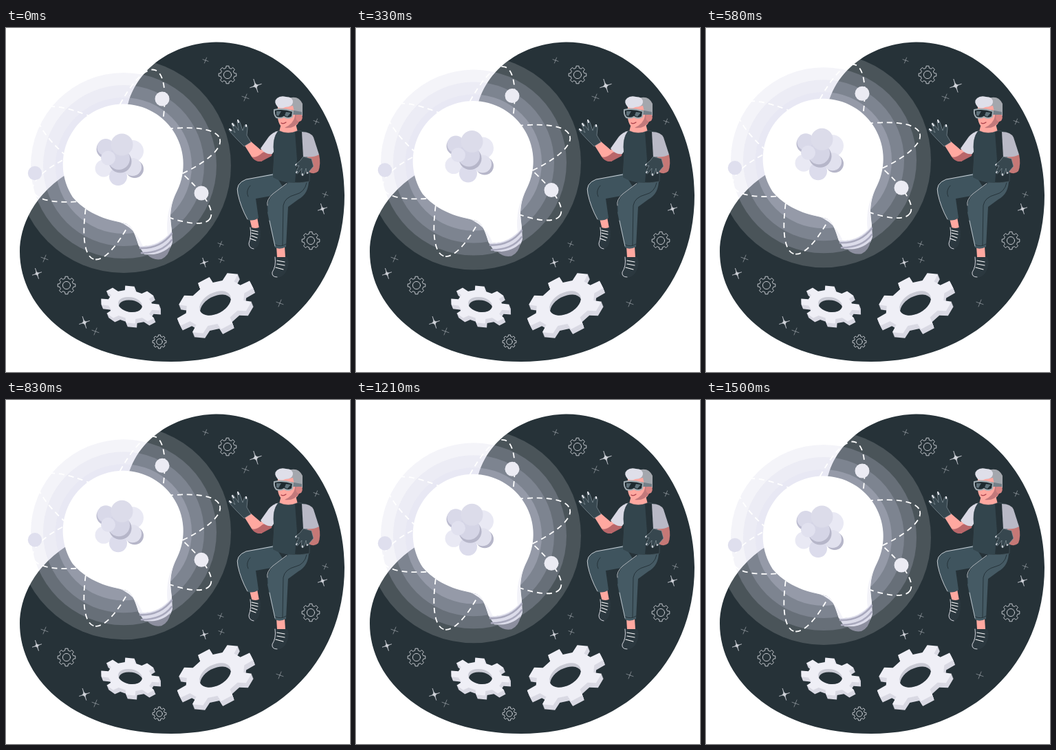
An HTML page for the animation above (1540 ms loop, 500 px wide and 500 px high).

```html
<!DOCTYPE html>
<html lang="en">
<head>
<meta charset="utf-8">
<title>Floating idea</title>
<style>
  html, body { margin: 0; width: 100%; height: 100%; overflow: hidden; background: #fff; }
  svg { display: block; width: 100vw; height: 100vh; }
  .line { fill: none; stroke-linecap: round; stroke-linejoin: round; }
</style>
</head>
<body>
<svg viewBox="0 0 500 500">
  <path fill="#263238" d="M305 20.5C410 20 492 125 492 243C492 385 385 485 240 485C105 485 20 410 20 325C20 290 38 240 100 205C160 180 168 140 178 108C192 60 240 22 305 20.5Z"/>
  <g id="sky" class="line" stroke="#d3d6dc" stroke-width=".9"></g>

  <g id="bulb">
    <g id="halo"></g>
    <g id="orbits" class="line" stroke="#fff" stroke-width="1.8" stroke-dasharray="8 6" style="stroke-linecap:butt"></g>
    <path fill="#dcdcea" d="M193 317Q222 318 241 294L242 311Q238 328 222 330L201 329Z"/>
    <path fill="#8d8f9f" d="M206 330Q228 329 239 317Q237 331 226 336Q214 338 206 330Z"/>
    <g class="line" stroke="#a9a9bd" stroke-width="2.6">
      <path d="M195 320Q224 321 241 299M197 327Q227 327 241 308"/>
    </g>
    <path fill="#fff" d="M249 236C243 248 240 258 239 272C239 282 240 288 241 295Q222 319 193 317C188 303 185 290 176 285C160 280 125 278 97 246A87.5 87.5 0 1 1 249 236Z"/>
    <path fill="#f3f3f9" d="M251 232C241 250 239 260 239 276L241 295L235 302Q230 266 251 232ZM146 277Q184 282 199 317L193 317Q186 290 176 285Z"/>
    <g id="atom"></g>
  </g>

  <g id="gears"></g>

  <g id="person">
    <!-- far leg -->
    <path fill="#ffa8a0" d="M354 277L365 275L368 291L358 293Z"/>
    <path fill="#2b383f" d="M355 289Q363 293 369 289Q371 300 369 309Q367 321 358 322Q352 321 353 313Q357 301 355 289Z"/>
    <path fill="#3f545e" d="M390 211L349 220Q333 226 337 241Q341 260 352 279Q360 281 367 276L363 248L408 240Z"/>
    <path class="line" stroke="#d8dde2" stroke-width=".9" d="M388 213L349 220Q333 226 337 241Q341 260 351 278"/>
    <!-- near leg -->
    <path fill="#ffa8a0" d="M393 317L405 317L406 333L394 333Z"/>
    <path fill="#2b383f" d="M391 332Q401 337 408 332Q413 339 409 350Q404 363 392 363Q385 362 387 354Q393 345 391 332Z"/>
    <path fill="#455a64" d="M391 213L440 221Q440 241 425 249L410 260L407 318Q398 323 391 319Q385 294 380 268Q378 251 388 241L410 224Z"/>
    <path class="line" stroke="#26343b" stroke-width="1" d="M410 225L388 241Q378 251 380 267M437 225Q434 239 421 242Q405 246 403 258L402 316M355 229Q348 237 352 245M391 315Q400 319 407 314"/>
    <path class="line" stroke="#d8dde2" stroke-width=".8" d="M380 258Q378 250 388 241L408 226M391 317L383 280"/>
    <path class="line" stroke="#fff" stroke-width="1.2" d="M357 294L366 296M357 298L366 300M357 302L365 305M355 306L363 309M394 338L405 340M394 343L405 345M392 348L403 351"/>
    <path class="line" stroke="#e8e8f0" stroke-width=".9" d="M355 290Q357 302 353 313Q353 320 360 321M391 333Q393 346 387 355Q386 362 394 362"/>

    <!-- far arm -->
    <path fill="#ffa8a0" d="M347 171L356 165L370 177L383 169L389 180L371 194Q362 194 357 187Z"/>
    <path fill="#b9676a" d="M357 187Q363 190 373 181L388 176L386 186L371 194Q362 195 357 187Z"/>
    <path fill="#d9d9e4" d="M398 149Q388 151 382 158L370 175Q378 185 387 183L398 165Z"/>
    <path fill="#37474f" stroke="#91a0a8" stroke-width=".6" d="M346 172L335 161L325 150Q322 146 327 147L333 152L328 140Q329 136 332 140L338 149L336 136Q338 132 340 137L344 149L347 141Q351 139 351 145L350 156L356 166Z"/>
    <path class="line" stroke="#f2f2f7" stroke-width="2" d="M325 147L327 149M329 139L331 142M337 134L338 137M349 141L349 143"/>

    <!-- torso -->
    <path fill="#ffa8a0" d="M400 139L421 139L424 151Q411 160 397 151Z"/>
    <path fill="#263238" stroke="#4a5b64" stroke-width=".6" d="M396 149Q410 156 425 149L438 152Q443 165 442 184L441 223Q413 229 388 217L390 184Q386 161 396 149Z"/>
    <path fill="#33454d" d="M396 150Q409 156 420 151L423 191L420 225Q401 225 388 217L390 184Q387 162 396 150Z"/>

    <!-- near arm -->
    <path fill="#c57876" d="M439 183L455 184Q458 198 454 208Q448 214 440 209L435 200Z"/>
    <path fill="#b9b9c6" d="M430 151Q443 151 447 159L455 184Q446 189 432 187Z"/>
    <path fill="#37474f" stroke="#91a0a8" stroke-width=".6" d="M444 190L432 187Q428 194 421 198Q419 202 426 200L421 210Q423 214 426 209L430 204L429 213Q432 217 434 211L436 204L437 212Q440 212 441 208L447 201Z"/>
    <path class="line" stroke="#f2f2f7" stroke-width="1.6" d="M421 199L422 198M422 210L423 209M431 214L431 212M438 211L438 210"/>

    <!-- head -->
    <path fill="#ffa8a0" d="M395 110L426 110L426 136Q421 147 407 146Q397 145 395 131Z"/>
    <path fill="#c3797b" d="M420 117L427 117L427 135Q419 147 405 145Q418 139 420 128Z"/>
    <path fill="#a4a7ad" d="M406 104Q424 95 431 110L431 128L420 126L417 113L407 115Z"/>
    <path fill="#dfdfe9" d="M395 115Q388 107 394 102Q399 98 407 100Q417 100 417 108Q416 115 406 115Q400 118 395 115Z"/>
    <ellipse cx="426" cy="130" rx="4.8" ry="6" fill="#d98684"/>
    <path fill="#758088" d="M414 119L430 122L430 126L414 126Z"/>
    <path fill="#1d292f" stroke="#a3adb3" stroke-width="2" d="M390 119Q403 116 417 121L416 129Q410 133 404 129Q400 132 393 130Q389 126 390 119Z"/>
    <path fill="#60727b" d="M393 121L400 121L396 128L393 127ZM407 122L414 123L409 129L405 127Z"/>
    <path class="line" stroke="#a83f48" stroke-width="1.2" d="M400 138Q403 140 407 137"/>
  </g>
</svg>
<script>
const fill = (id, html) => document.getElementById(id).innerHTML = html;

// Closed cog outline: four points per tooth on an ellipse tilted by `tilt` degrees.
function cog(cx, cy, a, b, tilt = 0, phase = 0, root = .76) {
  const turn = tilt * Math.PI / 180, points = [];
  for (let tooth = 0; tooth < 8; tooth++) {
    for (const [angle, scale] of [[-13, root], [-9, 1], [9, 1], [13, root]]) {
      const p = (phase + tooth * 45 + angle) * Math.PI / 180;
      const x = a * scale * Math.cos(p), y = b * scale * Math.sin(p);
      points.push([cx + x * Math.cos(turn) - y * Math.sin(turn),
                   cy + x * Math.sin(turn) + y * Math.cos(turn)].map(v => v.toFixed(1)));
    }
  }
  return `M${points.join('L')}Z`;
}

const circle = (x, y, r, color, attrs = '') =>
  `<circle cx="${x}" cy="${y}" r="${r}" fill="${color}" ${attrs}/>`;
const ellipse = (x, y, rx, ry, tilt, attrs = '') =>
  `<ellipse rx="${rx}" ry="${ry}" transform="translate(${x} ${y}) rotate(${tilt})" ${attrs}/>`;

const cogIcon = ([x, y, r]) =>
  `<path d="${cog(x, y, r, r, 0, 0, .78)}"/><circle cx="${x}" cy="${y}" r="${r * .43}"/>`;
const star = ([x, y, r]) =>
  `<path transform="translate(${x} ${y}) rotate(-18) scale(${r})" fill="#d3d6dc" stroke-width="${.5 / r}"
    d="M0-1C0-.1 .1 0 .9 0C.1 0 0 .1 0 1C0 .1-.1 0-.9 0C-.1 0 0-.1 0-1Z"/>`;
const cross = ([x, y, r]) =>
  `<path opacity=".55" d="M${x - r} ${y - r * .35}L${x + r} ${y + r * .35}M${x + r * .4} ${y - r}L${x - r * .4} ${y + r}"/>`;

fill('sky',
  [[322, 68, 13], [88, 374, 13], [443, 309, 13], [223, 456, 10]].map(cogIcon).join('') +
  [[363, 84, 10], [460, 263, 8], [114, 428, 9], [45, 357, 8], [288, 341, 7]].map(star).join('') +
  [[290, 47, 4], [348, 101, 5], [451, 136, 4], [464, 242, 4], [312, 314, 4],
   [313, 337, 4], [398, 400, 5], [130, 441, 5], [56, 335, 5]].map(cross).join(''));

fill('halo', [
  [156, '#fff', .165], [135, '#cbcbe3', .22], [117, '#cbcbe3', .22], [99, '#dcdced', .25]
].map(([r, color, alpha]) => circle(171, 200, r, color, `fill-opacity="${alpha}"`)).join(''));

fill('orbits',
  [[175, 199, 141, -15.5], [172, 199, 147, 32], [172, 198.5, 144.5, 108]]
    .map(([x, y, a, tilt]) => ellipse(x, y, a, 40, tilt)).join('') +
  [[227, 103, 10.5, '#ebebf3'], [284, 240, 10.5, '#ebebf3'], [42, 211, 10.2, '#dfdfee']]
    .map(orb => circle(...orb, 'stroke="none"')).join(''));

fill('atom', [
  [184, 179, 16, '#e9e9f4'], [145, 176, 13.5, '#bcbcd0'], [145, 173.5, 12.5, '#d9d9e9'],
  [142, 204, 12.5, '#e9e9f4'], [163, 216, 13, '#dcdcec'], [187, 205, 13, '#b6b6c9'],
  [184, 202, 13, '#e1e1ee'], [166, 194, 16.5, '#b6b6c9'], [164, 190, 16, '#d5d5e6'],
  [168.5, 169.5, 16, '#dcdcea'], [148.5, 189, 10.5, '#e1e1ef']
].map(ball => circle(...ball)).join(''));

function solidGear(x, y, a, b, tilt, phase, depth) {
  const hole = [a * .41, b * .4, tilt];
  let sides = '';
  for (let d = depth; d > 0; d--)
    sides += `<path fill="#d9d9e3" d="${cog(x + d * .4, y + d, a, b, tilt, phase)}"/>`;
  return sides +
    `<path fill="#efeff6" d="${cog(x, y, a, b, tilt, phase)}"/>` +
    ellipse(x, y, ...hole, 'fill="#c9cad4"') +
    `<clipPath id="hole${x}">${ellipse(x, y, ...hole)}</clipPath>
     <g clip-path="url(#hole${x})">${ellipse(x + 1, y + depth * .75, ...hole, 'fill="#263238"')}</g>`;
}
fill('gears', solidGear(180.5, 402, 43, 27, 10, 38, 6) + solidGear(304, 400, 60, 38, -28, 46, 7));

// Linear bob, shown at 24 pictures per second.
const LOOP = 1540, STEP = 1000 / 24, PERIOD = 1500, LEAD = 45, RISE = 10;
const bulb = document.getElementById('bulb');
const start = performance.now();

function draw(now) {
  const elapsed = Math.max(0, now - start) % LOOP;
  const time = Math.floor((elapsed + 4) / STEP) * STEP;
  const phase = (time + LEAD) / PERIOD % 1;
  const lift = RISE * (1 - Math.abs(2 * phase - 1));
  bulb.setAttribute('transform', `translate(0 ${(.6 - lift).toFixed(2)})`);
  requestAnimationFrame(draw);
}
draw(start);
</script>
</body>
</html>
```
